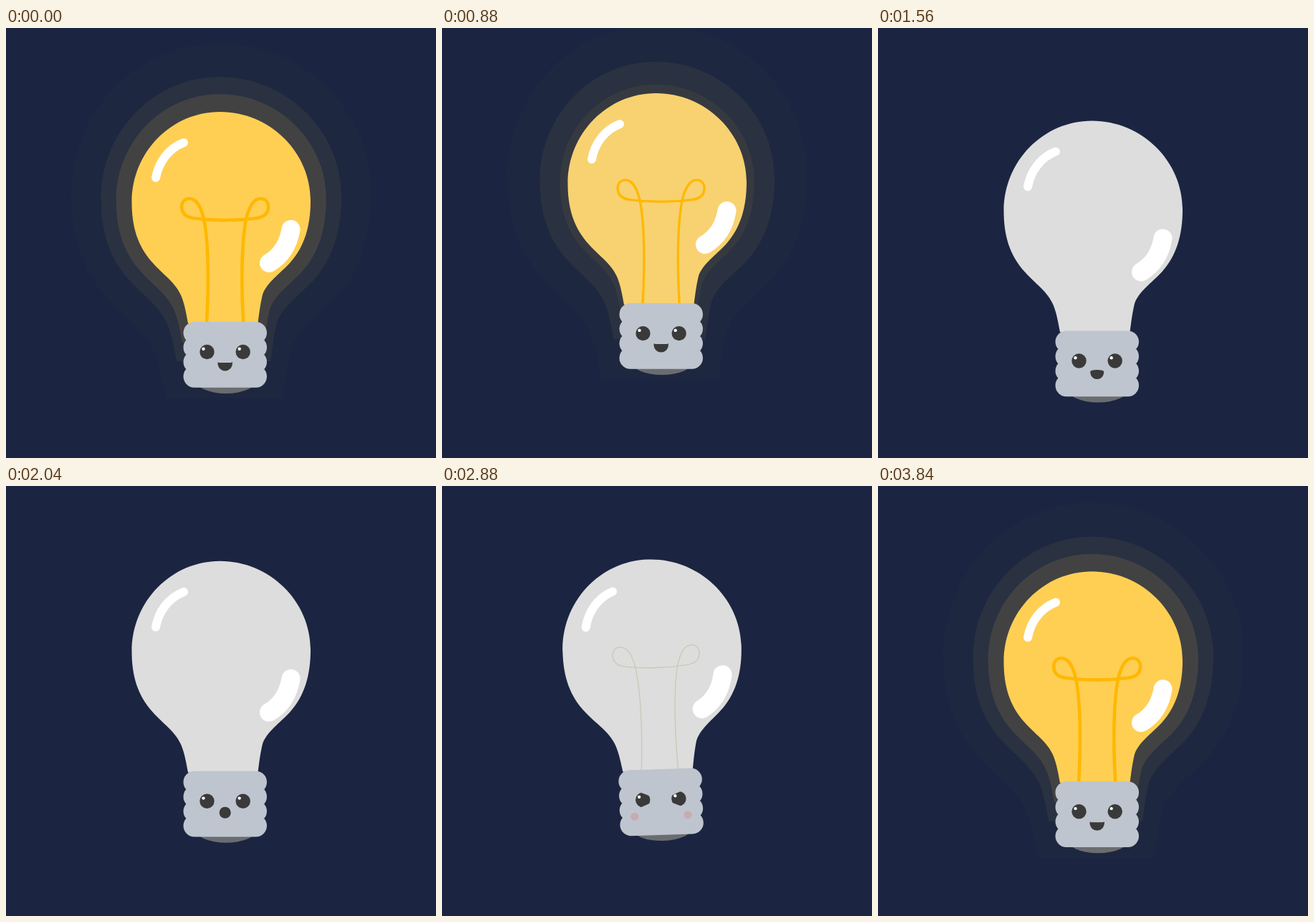
An HTML page with a canvas for the animation above (3.88 s loop, 600 by 600 pixels).

```html
<!DOCTYPE html>
<html lang="en">
<head>
<meta charset="utf-8">
<title>Light bulb</title>
<style>
  html, body { margin: 0; width: 100%; height: 100%; overflow: hidden; background: #1b2541; }
  canvas { display: block; }
</style>
</head>
<body>
<canvas id="stage" width="600" height="600"></canvas>
<script>
const ctx = document.getElementById('stage').getContext('2d');
const LOOP = 3880, TAU = Math.PI * 2, DEG = Math.PI / 180;
const PIVOT = { x: 306, y: 460 };
const YELLOW = [255, 207, 84], AMBER = [255, 184, 0], GLASS = [221, 221, 221], COLD_WIRE = [202, 201, 178];
const DARK = '#3a3a3a';

const bulb = new Path2D('M254 412C252 402 250 388 245 375C237 355 219 344 205 328C183 304 175.5 276 175.5 243C175.5 173 231 117 298.5 117C368 117 425 173 425 241C425 275 417 305 396 328C382 343 364 355 358 372C355 384 353 400 351.5 412Z');
const halfWire = new Path2D('M280 411C283 360 283 300 276 266C271 245 263 238 256 238C247 238 244 246 245.5 253C247 262 255 264.5 262 265.5Q283 268.3 305.6 268.3');
const wire = new Path2D(halfWire);
wire.addPath(halfWire, new DOMMatrix([-1, 0, 0, 1, 611.2, 0]));
const smallShine = new Path2D('M209 209C213 187 227 168 248 160');
const bigShine = new Path2D('M397.5 281C394 302 384 318 367 328');

const lerp = (a, b, p) => a + (b - a) * p;
const mix = (a, b, p) => `rgb(${a.map((v, i) => lerp(v, b[i], p)).join()})`;

function smooth(from, to, t) {
  const p = Math.min(1, Math.max(0, (t - from) / (to - from)));
  return p * p * (3 - 2 * p);
}

// Rises from 0 to 1, then falls back to 0
const pulse = (t, in0, in1, out0, out1) => smooth(in0, in1, t) - smooth(out0, out1, t);

// Two bobs per loop, with a slightly uneven pace
function floatY(t) {
  const a = TAU * t / LOOP;
  const drift = 14 - 5 * Math.cos(a) - 7 * Math.sin(a) - 9 * Math.cos(2 * a) - 3 * Math.sin(2 * a);
  return -12.5 + 25 * Math.cos(2 * a + (60 + drift) * DEG);
}

const tilt = t => 4.2 * pulse(t, 2280, 2480, 2480, 2740) - 1.9 * pulse(t, 2480, 2740, 3280, 3380);

function dot(x, y, rx, color, ry = rx) {
  ctx.fillStyle = color;
  ctx.beginPath();
  ctx.ellipse(x, y, rx, ry, 0, 0, TAU);
  ctx.fill();
}

function line(path, width, color, cap) {
  ctx.lineWidth = width;
  ctx.strokeStyle = color;
  ctx.lineCap = cap;
  ctx.stroke(path);
}

function drawHalos(t) {
  [0.11, 0.06, 0.008].forEach((opacity, i) => {
    const level = 1 - pulse(t, 640 + 140 * i, 1120 + 200 * i, 3040 + 20 * i, 3440 + 40 * i);
    const scale = 1 + 0.175 * 1.97 ** i * level;
    ctx.save();
    ctx.translate(300, 258);
    ctx.scale(scale, scale);
    ctx.translate(-300, -258);
    ctx.fillStyle = `rgba(${YELLOW},${opacity * level})`;
    ctx.fill(bulb);
    ctx.restore();
  });
}

function drawBulb(t) {
  ctx.fillStyle = mix(YELLOW, GLASS, pulse(t, 640, 1460, 3020, 3500));
  ctx.fill(bulb);
  const width = 4.6 * (1 - pulse(t, 560, 1500, 2660, 3280));
  const cold = pulse(t, 1500, 1600, 2880, 3700);
  if (width > 0.02) line(wire, width, mix(AMBER, COLD_WIRE, cold), 'butt');
  line(smallShine, 12, '#fff', 'round');
  line(bigShine, 26, '#fff', 'round');
}

function drawCap() {
  dot(307, 490, 44, '#6a6c70', 20);
  ctx.fillStyle = '#bec5ce';
  ctx.beginPath();
  for (let i = 0; i < 4; i++) ctx.roundRect(247.5, 410 + 20.3 * i, 116.5, 30.8, 15.4);
  ctx.rect(262, 410, 88, 91.7);
  ctx.fill();
}

function drawEye(x, side, anger) {
  const inner = lerp(18, 4.3, anger);
  ctx.save();
  ctx.translate(x, 452);
  ctx.save();
  ctx.scale(side, 1);
  ctx.beginPath();
  ctx.moveTo(-12, -14);
  ctx.lineTo(12, -inner);
  ctx.lineTo(12, inner);
  ctx.lineTo(-12, 14);
  ctx.clip();
  dot(0, 0, 10.2, DARK);
  ctx.restore();
  dot(-5, -4.2, 2.2, '#fff');
  ctx.restore();
}

// A smile that rounds into an "o"
function drawMouth(size, gasp) {
  if (size < 0.01) return;
  const w = lerp(9.5, 7.3, gasp), y = lerp(-1, 0, gasp);
  const top = y + lerp(1.2, -9.7, gasp), bottom = y + lerp(14.3, 9.7, gasp);
  ctx.save();
  ctx.translate(305.7, 468);
  ctx.scale(size, size);
  ctx.beginPath();
  ctx.moveTo(-w, y);
  ctx.bezierCurveTo(-w, top, w, top, w, y);
  ctx.bezierCurveTo(w, bottom, -w, bottom, -w, y);
  ctx.closePath();
  ctx.fillStyle = ctx.strokeStyle = DARK;
  ctx.lineWidth = 1.5;
  ctx.lineJoin = 'round';
  ctx.fill();
  ctx.stroke();
  ctx.restore();
}

function drawFace(t) {
  const anger = pulse(t, 2540, 2700, 3300, 3400);
  ctx.globalAlpha = anger;
  for (const x of [268.3, 342.5]) dot(x, 475, 5.6, '#c7acb2');
  ctx.globalAlpha = 1;
  drawEye(280.5, 1, anger);
  drawEye(330.7, -1, anger);
  drawMouth(1 - pulse(t, 2360, 2560, 3340, 3460), pulse(t, 1480, 1680, 2600, 2700));
}

function draw(t) {
  ctx.fillStyle = '#1b2541';
  ctx.fillRect(0, 0, 600, 600);
  ctx.save();
  ctx.translate(PIVOT.x, PIVOT.y + floatY(t));
  ctx.rotate(tilt(t) * DEG);
  ctx.translate(-PIVOT.x, -PIVOT.y);
  drawHalos(t);
  drawBulb(t);
  drawCap();
  drawFace(t);
  ctx.restore();
}

const start = performance.now();
function tick() {
  draw((performance.now() - start) % LOOP);
  requestAnimationFrame(tick);
}
tick();
</script>
</body>
</html>
```
